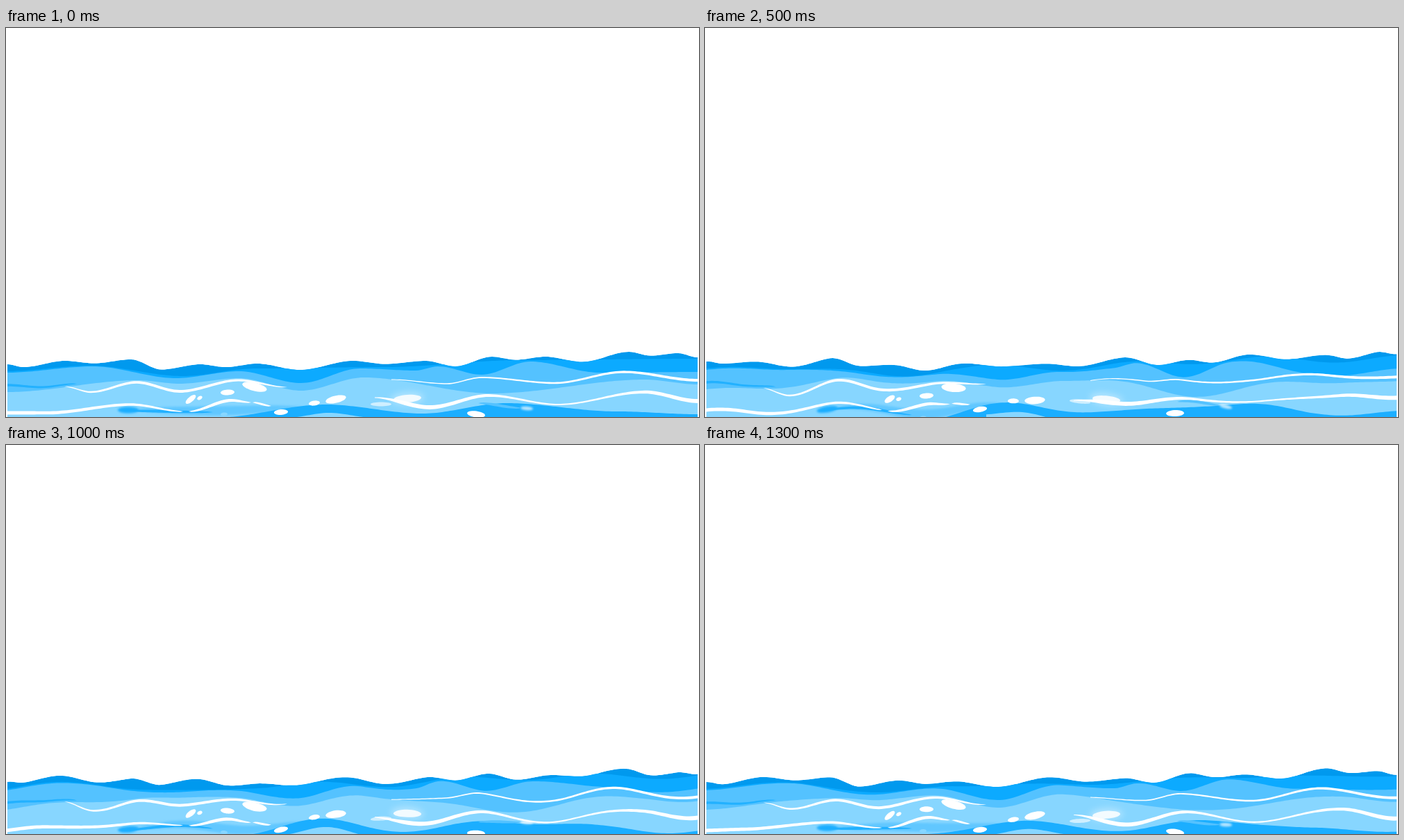
An HTML page that plays this animation: 998 by 561 pixels, repeating every 1.4 s.

```html
<!DOCTYPE html>
<html lang="en">
<head>
<meta charset="utf-8">
<title>Waves</title>
<style>
html, body { margin: 0; width: 100%; height: 100%; overflow: hidden; background: #fff; }
svg { display: block; width: 998px; height: 561px; }
</style>
</head>
<body>
<svg viewBox="0 0 998 561">
  <defs>
    <clipPath id="sea"><path id="surface"/></clipPath>
    <filter id="soft" x="-50%" y="-100%" width="200%" height="300%"><feGaussianBlur stdDeviation="1.4"/></filter>
    <filter id="glow" x="-50%" y="-150%" width="200%" height="400%"><feGaussianBlur stdDeviation="5"/></filter>
  </defs>
  <g id="water" clip-path="url(#sea)"></g>
</svg>
<script>
const LOOP = 1400, STEP = 100;
const LEFT = 2, RIGHT = 996, FLOOR = 580;
const AMP = 2.8, WAVELENGTH = 197, TAU = 2 * Math.PI;
const DEEP = '#0099ee', BLUE = '#0caaff', LIGHT = '#54c2ff', PALE = '#87d6ff', POOL = '#1baeff', WHITE = '#fff';
const water = document.getElementById('water');
const surface = document.getElementById('surface');
const parts = [];

const parse = s => s.trim().split(/\s+/).map(p => p.split(',').map(Number));

// Swell through its highs and lows, eased between neighbours
function swell(keys) {
  const line = [];
  for (let i = 0; i < keys.length - 1; i++) {
    const [x0, y0] = keys[i], [x1, y1] = keys[i + 1];
    const n = Math.max(2, Math.ceil((x1 - x0) / 4));
    for (let j = 0; j < n; j++) {
      const u = j / n;
      line.push([x0 + (x1 - x0) * u, y0 + (y1 - y0) * u * u * (3 - 2 * u)]);
    }
  }
  line.push(keys[keys.length - 1]);
  return line;
}

function add(outline, fill, { opacity = 1, filter, shift = 0 } = {}) {
  const node = document.createElementNS('http://www.w3.org/2000/svg', 'path');
  node.setAttribute('fill', fill);
  node.setAttribute('opacity', opacity);
  if (filter) node.setAttribute('filter', `url(#${filter})`);
  water.appendChild(node);
  parts.push({ node, outline, shift });
}

function layer(keys, fill) {
  const line = swell(keys);
  add([...line, [line[line.length - 1][0], FLOOR], [line[0][0], FLOOR]], fill);
}

// Brush profiles along a stroke, u from 0 to 1
const taper = u => Math.sin(Math.PI * u) ** 0.5;
const fadeOut = u => (1 - u) ** 0.3;
const swelling = u => 0.25 + 0.75 * u;
const pinched = u => Math.min(1, 0.15 + u * 9) * (0.35 + 0.65 * Math.cos(Math.PI * (u - 0.1) / 0.95) ** 2);

function ribbon(s, width, profile, fill, opt) {
  const line = swell(parse(s)), x0 = line[0][0], span = line[line.length - 1][0] - x0;
  const side = k => line.map(([x, y]) => [x, y + k * width / 2 * profile((x - x0) / span)]);
  add([...side(-1), ...side(1).reverse()], fill, opt);
}

function blob(x, y, rx, ry, tilt, fill, opt) {
  const c = Math.cos(tilt * TAU / 360), s = Math.sin(tilt * TAU / 360);
  const out = Array.from({ length: 36 }, (_, i) => {
    const u = rx * Math.cos(TAU * i / 36), v = ry * Math.sin(TAU * i / 36);
    return [x + u * c - v * s, y + u * s + v * c];
  });
  add(out, fill, opt);
}

// Crests come in pairs: a shallow dip within a pair, a deep one between pairs
function crestLine() {
  const tops = parse('85,480 180,478 280,485 362,484 500,480 605,480 700,474 777,474 897,467 968,469');
  const keys = [[LEFT, 485], [25, 489]];
  tops.forEach(([x, y], i) => {
    keys.push([x, y]);
    if (i === tops.length - 1) return;
    const [nx, ny] = tops[i + 1];
    keys.push([x + (nx - x) * 0.44, (y + ny) / 2 + (i % 2 ? 11 : 4.5)]);
  });
  return [...keys, [RIGHT, 475]];
}

layer(crestLine(), DEEP);
const crest = parts[0];
layer(parse('2,495 120,487 255,502 360,491 545,489 740,479 996,477'), BLUE);
layer(parse('2,497 125,488 245,505 335,495 425,512 510,491 590,494 622,488 685,500 755,481 855,497 996,496'), LIGHT);
layer(parse('2,525 190,508 250,513 335,505 425,523 515,504 700,527 920,507 996,514'), PALE);
ribbon('2,515 50,518 102,513', 3.5, fadeOut, POOL, { opacity: .85 });

// Lower pools
ribbon('185,551 300,552 430,548', 13, taper, LIGHT, { filter: 'soft', opacity: .75 });
layer(parse('300,562 460,543 600,556 720,541 880,553 996,557'), POOL);
layer(parse('405,562 465,555 530,562'), PALE);
blob(176, 551, 15, 4.5, 0, POOL, { filter: 'soft' });
ribbon('165,552 298,554', 4, taper, POOL, { opacity: .9 });

// White streaks
ribbon('84,517 122,525 188,511 250,524 335,508 405,518', 4, taper, WHITE);
ribbon('2,555 60,555 180,543 255,553', 5, fadeOut, WHITE);
ribbon('263,553 325,537 353,540', 4.5, taper, WHITE);
ribbon('355,540 382,545', 3, taper, WHITE);
ribbon('555,507 635,513 685,504 790,512 890,496 996,508', 4, swelling, WHITE);
ribbon('531,533 610,547 695,530 795,543 920,525 996,538', 6, pinched, WHITE);

// Bubbles
const bubble = (x, y, size, tilt) => blob(x, y, size, 1.5 + size * 0.25, tilt, WHITE);
bubble(358, 517.5, 18, 14);
bubble(319, 525.5, 10, -3);
bubble(266, 535.5, 9, -40);
bubble(279, 533.5, 4, -30);
bubble(396, 554, 10, -4);
bubble(444, 541, 8, -8);
bubble(475, 535.5, 15, -13);
blob(314, 557, 5, 2.5, -5, PALE);

// Glints on the right, out of step with the rest
const glint = (x, y, rx, ry, tilt, opacity, filter) =>
  blob(x, y, rx, ry, tilt, WHITE, { opacity, filter, shift: 170 / 360 });
glint(578, 534, 24, 9, -3, .35, 'glow');
glint(578, 534.5, 20, 5.5, -4, .85);
glint(540, 542.5, 15, 3, 0, .6);
glint(677, 557, 13, 4.5, 8, 1);
glint(750, 548.5, 9, 2.7, 4, .7, 'soft');
ribbon('680,541 742,548', 4, taper, LIGHT, { shift: 170 / 360 });

// Vertical ripple travelling to the right, at rest when t = 0
function ripple(x, turn, shift) {
  const phase = TAU * ((x - 36) / WAVELENGTH + shift);
  return AMP * (Math.cos(turn - phase) - Math.cos(phase));
}

function draw(ms) {
  const turn = TAU * Math.floor((ms % LOOP) / STEP) * STEP / LOOP;
  for (const { node, outline, shift } of parts) {
    const d = outline.map(([x, y]) => x.toFixed(1) + ' ' + (y + ripple(x, turn, shift)).toFixed(2));
    node.setAttribute('d', 'M' + d.join('L') + 'Z');
  }
  surface.setAttribute('d', crest.node.getAttribute('d'));
}

const start = performance.now();
function tick() {
  draw(performance.now() - start);
  requestAnimationFrame(tick);
}
tick();
</script>
</body>
</html>
```
